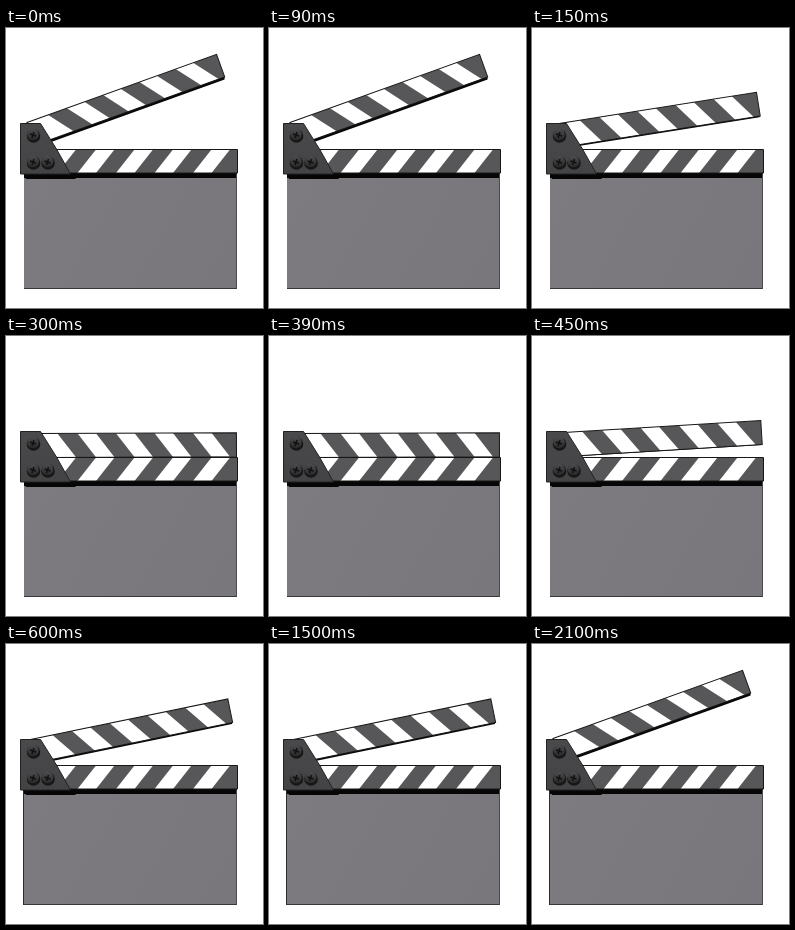
Animation, 257 px wide and 280 px high, one loop 2200 ms. Source, as an HTML page with a canvas:

```html
<!DOCTYPE html>
<html>
<head>
<meta charset="utf-8">
<style>
html, body { margin: 0; width: 100%; height: 100%; overflow: hidden; background: #fff; }
canvas { display: block; }
</style>
</head>
<body>
<canvas id="stage" width="257" height="280"></canvas>
<script>
const ctx = document.getElementById('stage').getContext('2d');
const LOOP = 2200, PITCH = 38.5, WHITE_W = 18.5, SLANT = 18.5;
const PIVOT = [16.5, 119];

// Each pose holds until the next one starts.
const poses = [
  { at: 0, angle: 19.8 },
  { at: 150, angle: 9 },
  { at: 300, angle: 0.2 },
  { at: 450, angle: 3.5 },
  { at: 600, angle: 11.6, outlined: true },
  { at: 2100, angle: 19.8, outlined: true }
];

function trace(...pts) {
  ctx.beginPath();
  pts.forEach(([x, y]) => ctx.lineTo(x, y));
  ctx.closePath();
}

function fill(color, ...pts) {
  trace(...pts);
  ctx.fillStyle = color;
  ctx.fill();
}

function line(color, width, ...pts) {
  ctx.beginPath();
  pts.forEach(([x, y]) => ctx.lineTo(x, y));
  ctx.strokeStyle = color;
  ctx.lineWidth = width;
  ctx.stroke();
}

function disc(color, x, y, r) {
  ctx.beginPath();
  ctx.arc(x, y, r, 0, 7);
  ctx.fillStyle = color;
  ctx.fill();
}

function gradient(x0, y0, x1, y1, from, to) {
  const g = ctx.createLinearGradient(x0, y0, x1, y1);
  g.addColorStop(0, from);
  g.addColorStop(1, to);
  return g;
}

// Striped stick; lean is how far a stripe drifts sideways from top to bottom.
function stick(top, bottom, leftTop, leftBottom, right, topEdge, lean) {
  const shape = [[leftTop, top], [right, top], [right, bottom], [leftBottom, bottom]];
  ctx.save();
  trace(...shape);
  ctx.clip();
  fill('#575759', ...shape);
  for (let k = 0; k < 5; k++) {
    const end = topEdge + k * PITCH;
    const start = end - (k ? WHITE_W : 45);
    fill('#fff', [start, top], [end, top], [end + lean, bottom], [start + lean, bottom]);
  }
  ctx.restore();
  trace(...shape);
  ctx.strokeStyle = '#171717';
  ctx.lineWidth = 1;
  ctx.stroke();
}

function board(outlined) {
  const left = outlined ? 17 : 18;
  fill(gradient(18, 146, 231, 261, '#7d7b80', '#79777c'),
    [left, 146], [231, 146], [231, 261], [left, 261]);
  fill('#060606', [left, 145], [231, 145], [230, 150], [left, 150]);
  line('#37363a', 1, [231, 260.5], [left, 260.5]);
  line('#4b4a4e', 1, [230.5, 146], [230.5, 261]);
  if (outlined) line('#2c2b2e', 1, [17.5, 147], [17.5, 261]);
}

function screw(x, y) {
  disc('#171718', x + 0.5, y + 1, 6.8);
  disc(gradient(x, y - 6, x, y + 5, '#4c4c4e', '#29292a'), x, y - 0.5, 5.8);
  line('#111', 1.5, [x - 3, y - 1], [x + 3, y + 1]);
  line('#111', 1.5, [x + 1, y - 3], [x - 1, y + 3]);
}

function plate() {
  fill('#060606', [18, 145], [65, 145], [70, 151], [20, 151]);
  const shape = [[14.5, 95.5], [34.5, 95.5], [50.5, 121], [64.5, 146], [14.5, 146]];
  fill(gradient(0, 95, 0, 146, '#4a4a4c', '#434345'), ...shape);
  trace(...shape);
  ctx.strokeStyle = '#222223';
  ctx.lineWidth = 1;
  ctx.stroke();
  screw(27, 107);
  screw(27, 134);
  screw(41.5, 134);
}

function draw({ angle, outlined }) {
  const depth = angle / 8;
  ctx.clearRect(0, 0, 257, 280);
  board(outlined);
  stick(121.5, 145, 40, 40, 231.5, 70, -SLANT);

  // The further the arm opens, the more of its underside shows.
  ctx.save();
  ctx.translate(...PIVOT);
  ctx.rotate(-angle * Math.PI / 180);
  ctx.translate(-PIVOT[0], -PIVOT[1]);
  fill('#080808', [40, 121], [230.5, 121], [229.5, 121.5 + depth], [40, 121.5 + depth]);
  stick(97.5, 121.5, 29, 42, 230.5, 51.5, SLANT);
  ctx.restore();

  plate();
}

function tick() {
  const t = performance.now() % LOOP;
  draw(poses.findLast(p => p.at <= t));
  requestAnimationFrame(tick);
}
tick();
</script>
</body>
</html>
```
